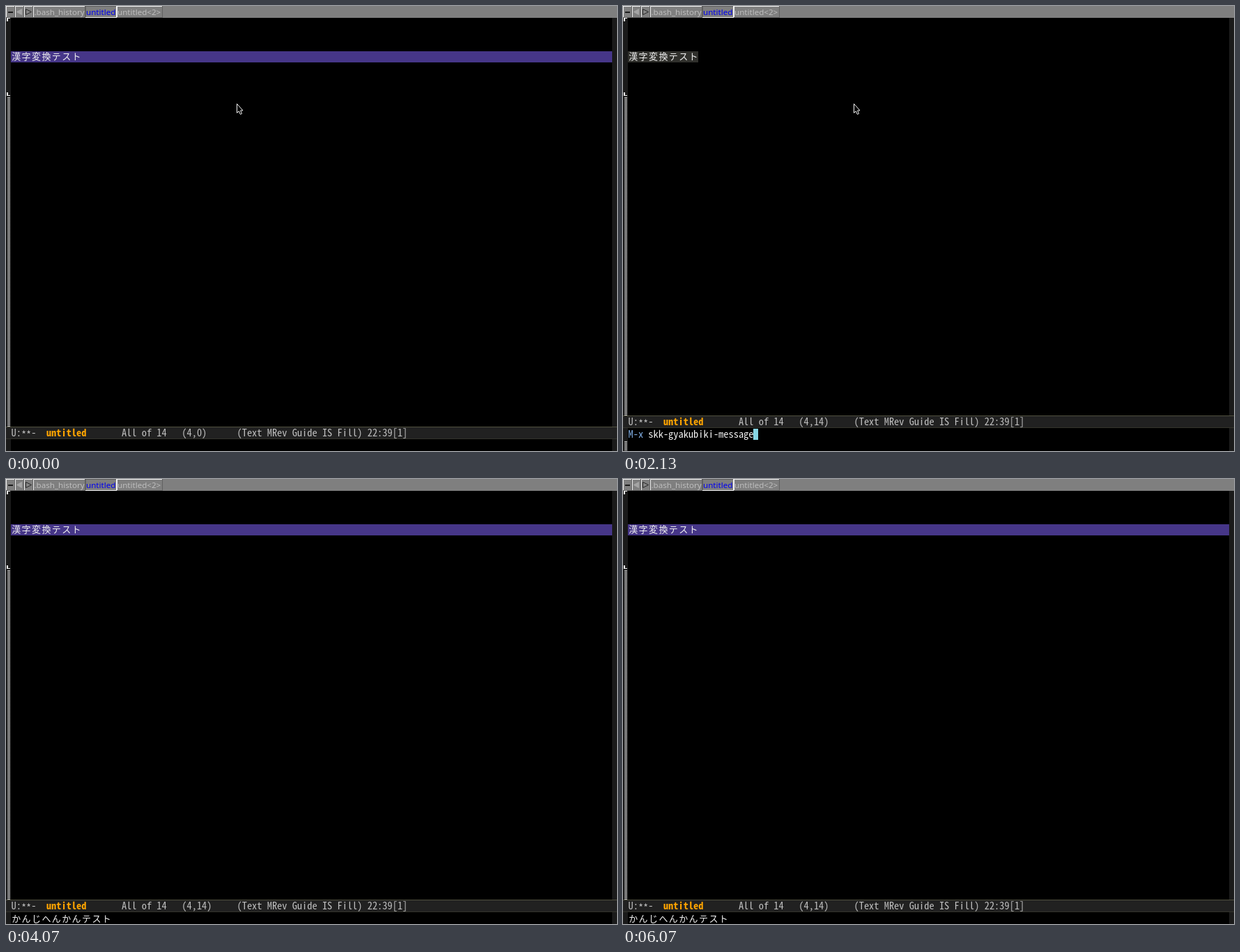
Animation of 877 by 639 pixels, one loop 6140 ms. Source, as an HTML page with a canvas:

```html
<!DOCTYPE html>
<html lang="ja">
<head>
<meta charset="utf-8">
<title>Editor</title>
<style>
html, body { margin: 0; width: 100%; height: 100%; overflow: hidden; background: #000; }
canvas { display: block; }
</style>
</head>
<body>
<canvas id="stage" width="877" height="639"></canvas>
<script>
const ctx = document.getElementById('stage').getContext('2d');
const W = 877, H = 639, LOOP = 6140, CELL = 7.2, LEFT = 7.5;
const MONO = '"Noto Sans Mono CJK JP", "Noto Sans Mono", "DejaVu Sans Mono", monospace';
const WIDE_SIZE = 13;
const WIDE = `${WIDE_SIZE}px "Noto Sans Mono CJK JP", "Noto Sans CJK JP", "Noto Sans CJK", sans-serif`;
const TAB_FONT = '11.6px "Noto Sans", "Open Sans", sans-serif';
const FRINGE = '#1a1a1a', PALE = '#f0f0f0', CURSOR = '#87d5e3';
const LINE = '漢字変換テスト', READING = 'かんじへんかんテスト';
const COMMAND = 'skk-gyakubiki-message';

// Times of the user's actions, in ms
const SELECT = 900, PROMPT = 1500, TYPE = 1600, TYPED = 2070, RESULT = 3000, POINTER_OFF = 4000;

// Narrow font size that fills one cell
ctx.font = '100px ' + MONO;
const narrowSize = CELL / ctx.measureText('M').width * 100;

function rect(color, x, y, w, h) {
  ctx.fillStyle = color;
  ctx.fillRect(x, y, w, h);
}

// Text on the character grid; wide characters take two cells
function cells(text, col, y, color, weight = '') {
  ctx.fillStyle = color;
  for (const ch of text) {
    const wide = ch > '\u2fff';
    ctx.font = wide ? WIDE : `${weight} ${narrowSize}px ${MONO}`;
    const inset = wide ? (2 * CELL - WIDE_SIZE) / 2 : 0;
    const drop = ch === '*' ? 3 : 0; // asterisks sit at mid height
    ctx.fillText(ch, LEFT + col * CELL + inset, y + drop);
    col += wide ? 2 : 1;
  }
}

function bevel(x, w, pressed) {
  const light = '#f2f2f2', dark = '#606060';
  const [a, b] = pressed ? [dark, light] : [light, dark];
  rect(a, x, 0, w, 1);
  rect(a, x, 0, 1, 17);
  rect(b, x, 16, w, 1);
  rect(b, x + w - 1, 0, 1, 17);
}

function label(text, x, color) {
  ctx.font = TAB_FONT;
  ctx.fillStyle = color;
  ctx.fillText(text, x, 13);
}

function triangle(x1, x2, fill, stroke) {
  ctx.beginPath();
  ctx.moveTo(x1, 4.5);
  ctx.lineTo(x2, 8.5);
  ctx.lineTo(x1, 12.5);
  ctx.closePath();
  ctx.fillStyle = fill;
  ctx.fill();
  ctx.strokeStyle = stroke;
  ctx.lineWidth = 1;
  ctx.stroke();
}

function tabs() {
  rect('#7f7f7f', 0, 0, W, 17);
  bevel(0, 13);
  bevel(13, 13);
  bevel(26, 13);
  rect('#1c1c1c', 3, 8, 7, 2);
  triangle(22.5, 15.5, '#a5a5a5', '#a5a5a5');
  triangle(28.5, 36.5, '#858585', '#262626');
  bevel(39, 75);
  label('.bash_history', 40.5, '#bebebe');
  bevel(114, 45, true);
  label('untitled', 115, '#0000f0');
  bevel(159, 66);
  label('untitled<2>', 160, '#bebebe');
}

function dashes(from, to) {
  for (let y = from; y < to; y += 2) rect('#d8d8d8', 2, y, 4, 1);
}

function fringes(bottom) {
  rect(FRINGE, 0, 17, 7, bottom - 17);
  rect(FRINGE, 870, 17, 7, bottom - 17);
  rect(PALE, 1, 17, 5, 1);
  rect(PALE, 1, 17, 2, 5);
  rect(PALE, 1, 124, 2, 5);
  rect(PALE, 1, 128, 5, 1);
  dashes(131, bottom);
}

function modeLine(y, column) {
  rect('#212121', 0, y, W, 18);
  rect('#50503f', 0, y, W, 1);
  rect('#34342c', 0, y + 17, W, 1);
  const base = y + 14, gray = '#bfbfbf';
  cells('U:**-', 0, base, gray);
  cells('untitled', 7, base, '#ffa500', 'bold');
  cells('All of 14', 22, base, gray);
  cells(`(4,${column})`, 34, base, gray);
  cells('(Text MRev Guide IS Fill) 22:39[1]', 45, base, gray);
}

function pointer() {
  const path = [[331.5, 140.5], [331.5, 153.5], [334.3, 151], [336.3, 155.5],
    [338.5, 154.6], [336.6, 150.2], [340, 150]];
  ctx.beginPath();
  path.forEach(([x, y]) => ctx.lineTo(x, y));
  ctx.closePath();
  ctx.fillStyle = '#000';
  ctx.fill();
  ctx.strokeStyle = '#f4f4f4';
  ctx.lineWidth = 1;
  ctx.stroke();
}

function draw(t) {
  const prompting = t >= PROMPT && t < RESULT;
  const selected = t >= SELECT && t < RESULT;
  const modeY = prompting ? 588 : 604;

  rect('#000', 0, 0, W, H);
  tabs();
  fringes(modeY);
  if (!prompting) rect('#463688', 7, 65, 863, 16);
  if (selected) {
    rect('#30302c', 7, 65, 101, 16);
    if (!prompting) rect(CURSOR, 108, 65, 7, 16);
  }
  cells(LINE, 0, 77, PALE);

  modeLine(modeY, t < SELECT ? 0 : 14);
  const echoY = modeY + 18;
  rect(FRINGE, 0, echoY, 7, H - echoY);
  rect(FRINGE, 870, echoY, 7, H - echoY);

  if (prompting) {
    const part = Math.max(0, Math.min(1, (t - TYPE) / (TYPED - TYPE)));
    const typed = COMMAND.slice(0, Math.floor(part * COMMAND.length));
    dashes(625, H);
    cells('M-x', 0, 620, '#82b0e6');
    cells(typed, 4, 620, PALE);
    rect(CURSOR, Math.floor(LEFT + (4 + typed.length) * CELL), 607, 7, 16);
  } else if (t >= RESULT) {
    cells(READING, 0, 635.5, PALE);
  }
  if (t < POINTER_OFF) pointer();
}

const start = performance.now();
function tick() {
  draw((performance.now() - start) % LOOP);
  requestAnimationFrame(tick);
}
tick();
</script>
</body>
</html>
```
